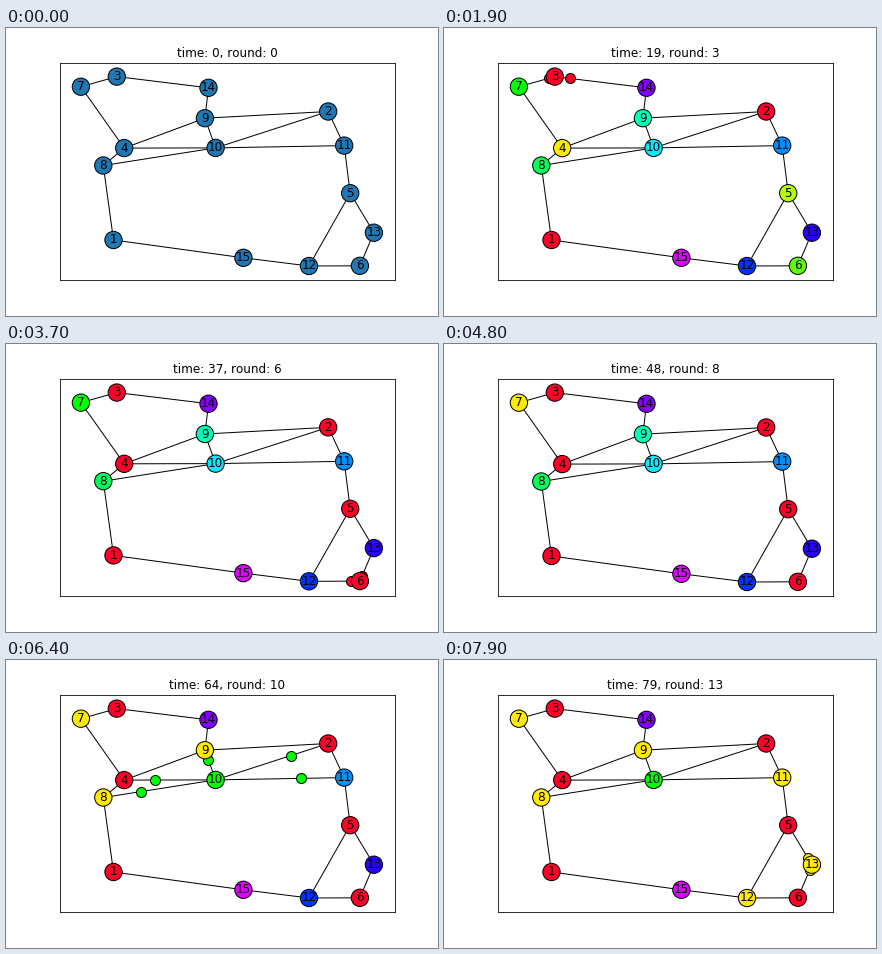
Animation, 432 px wide and 288 px high, one loop 8 s. Source, as a matplotlib script:

```python
import itertools

import matplotlib.pyplot as plt
import numpy as np
from matplotlib.animation import FuncAnimation

W, H, DPI = 432, 288, 72
STEPS = 6        # ticks per round
FRAMES = 80
LEFT, RIGHT, TOP, BOTTOM = 54, 388.8, 34.56, 252

# Node centres 1 to 15 in stage pixels, y pointing down
XY = np.array([
    (107.5, 212), (322.2, 83.5), (110.8, 48.6), (118.2, 120.1), (344.2, 165.2),
    (353.9, 237.8), (74.9, 58.7), (97.3, 137.5), (198.9, 90.2), (209.6, 119.9),
    (338.2, 117.6), (303, 238), (367.9, 204.7), (202.5, 59.8), (237.4, 229.8),
])
N = len(XY)

# Three walks that together cross every edge once
WALKS = [(8, 1, 15, 12, 6, 13, 5, 11, 10, 8, 4, 7, 3, 14, 9, 4, 10, 9, 2, 10),
         (5, 12), (2, 11)]
EDGES = [(a - 1, b - 1) for w in WALKS for a, b in itertools.pairwise(w)]
NEAR = [[a + b - n for a, b in EDGES if n in (a, b)] for n in range(N)]

CMAP = plt.get_cmap("gist_rainbow")
START = [CMAP(i / N) for i in range(N)]


def greedy():
    """Each node in turn takes the lowest colour its neighbours left free."""
    chosen = []
    for n in range(N):
        used = {chosen[m] for m in NEAR[n] if m < n}
        chosen.append(next(c for c in range(N) if c not in used))
    return chosen


FINAL = [CMAP(c / max(map(len, NEAR))) for c in greedy()]

plt.rcParams["font.family"] = "DejaVu Sans"
plt.rcParams["text.kerning_factor"] = 6
fig = plt.figure(figsize=(W / DPI, H / DPI), dpi=DPI, facecolor="white")
ax = fig.add_axes([LEFT / W, 1 - BOTTOM / H,
                   (RIGHT - LEFT) / W, (BOTTOM - TOP) / H])
ax.set(xlim=(LEFT, RIGHT), ylim=(BOTTOM, TOP), xticks=[], yticks=[])
title = ax.set_title("", fontsize=12)

for edge in EDGES:
    ax.plot(*XY[list(edge)].T, color="black", lw=1, zorder=1)
dots = ax.scatter([], [], s=100, edgecolors="black", linewidths=1, zorder=2)
nodes = ax.scatter(*XY.T, s=300, edgecolors="black", linewidths=1, zorder=3)
for n, (x, y) in enumerate(XY, 1):
    ax.text(x, y, str(n), fontsize=12, ha="center", va="center", zorder=4)


def update(t):
    rnd, step = divmod(t, STEPS)
    title.set_text(f"time: {t}, round: {rnd}")

    # A node takes its colour one tick after its round begins
    done = rnd if step else max(rnd - 1, 0)
    nodes.set_facecolor(FINAL[:done] + START[done:] if t else ["#1f77b4"] * N)

    stretch = 0
    sending = rnd > 0 and step > 0
    dots.set_visible(sending)
    if sending:
        src = XY[rnd - 1]
        spots = src + (XY[NEAR[rnd - 1]] - src) * step / STEPS
        dots.set_offsets(spots)
        dots.set_facecolor(FINAL[rnd - 1])
        # Messages along the lowest edge widen the view slightly
        stretch = max(0, spots[:, 1].max() + 0.9 - XY[:, 1].max())
    ax.set_ylim(BOTTOM + stretch, TOP)
    return nodes, dots, title


anim = FuncAnimation(fig, update, frames=FRAMES, interval=100, repeat=True)
plt.show()
```
